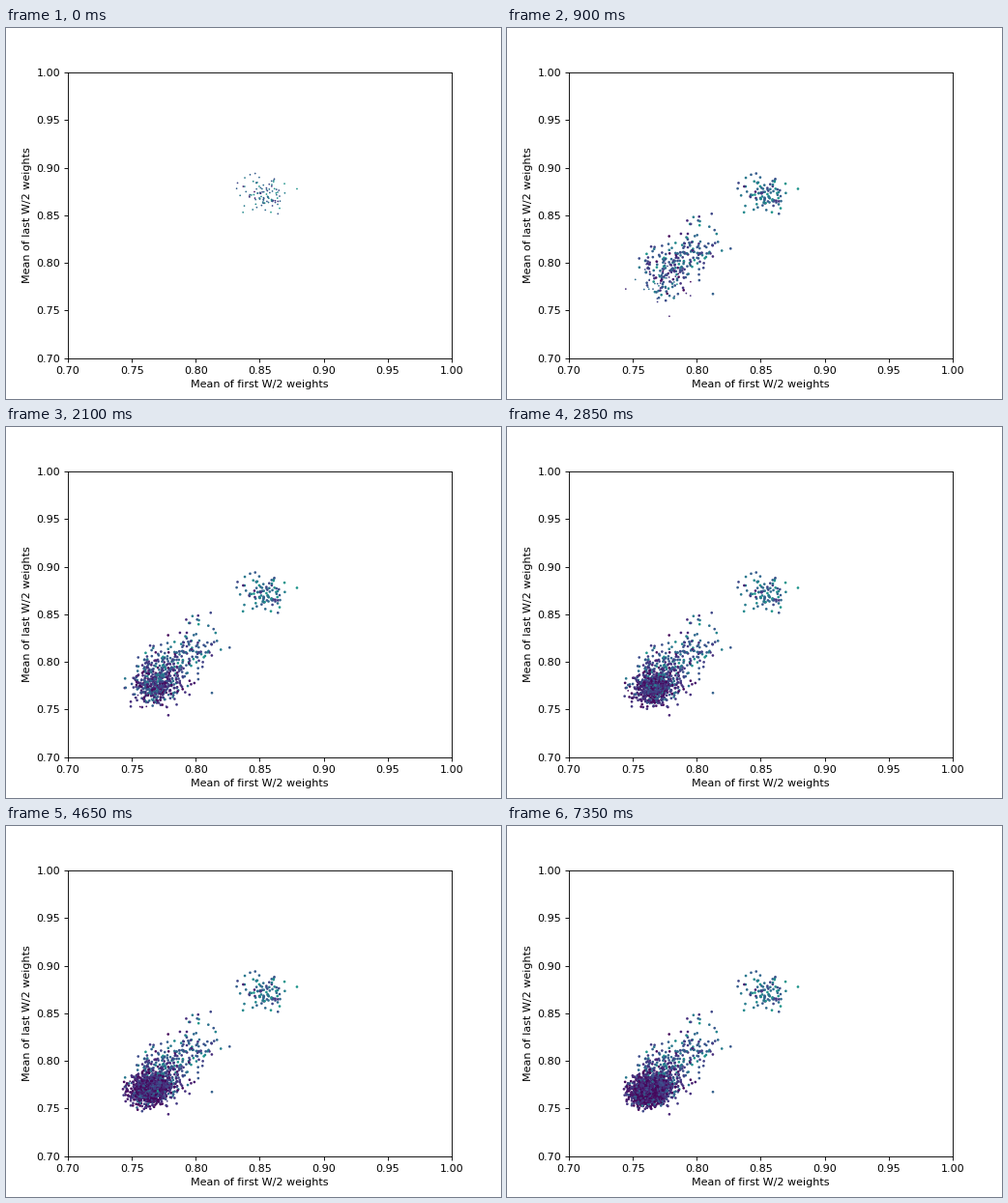
Write a matplotlib script that moves like this. It is 512 by 384 pixels and loops after 7.5 s.

```python
import numpy as np
import matplotlib.pyplot as plt
from matplotlib.animation import FuncAnimation

FRAMES, INTERVAL = 50, 150
FIRST, BATCH = 100, 48     # points in the opening batch and in each later one
FRESH, SETTLED = 2.4, 5.8  # marker areas in square points
LOW, HIGH = 0.7, 1.0

rng = np.random.default_rng(12)


def make_batch(step):
    """Positions (stage pixels) and colour values of the points born in a step."""
    if step == 0:
        size, centre, spread, tone = FIRST, (267, 172), (13, 9), 0.33
    else:
        size = BATCH
        drift = np.exp(-step / 3) + 0.25 * np.exp(-step / 16)
        shrink = np.exp(-step / 16)
        centre = (144 + 55 * drift, 277 - 57 * drift)
        spread = (7 + 10 * shrink, 5 + 8 * shrink)
        tone = 0.06 + 0.25 * shrink
    pos = rng.normal(centre, spread, (size, 2))
    value = np.clip(rng.normal(tone, 0.13, size), 0.02, 0.52)
    return pos, value


def to_data(pixels):
    """Stage pixels to axis values."""
    x = (pixels[:, 0] - 64) / 396.8
    y = (341.76 - pixels[:, 1]) / 295.68
    return LOW + (HIGH - LOW) * np.column_stack([x, y])


positions, tones = zip(*(make_batch(i) for i in range(FRAMES)))
points = to_data(np.vstack(positions))
values = np.concatenate(tones)

fig, ax = plt.subplots(figsize=(6.4, 4.8), dpi=80)
dots = ax.scatter([], [], c=[], linewidths=0, cmap="viridis", vmin=0, vmax=1)
ticks = np.linspace(LOW, HIGH, 7)
ax.set(xlim=(LOW, HIGH), ylim=(LOW, HIGH), xticks=ticks, yticks=ticks,
       xlabel="Mean of first W/2 weights", ylabel="Mean of last W/2 weights")


def draw(frame):
    count = FIRST + BATCH * frame
    settled = count - (BATCH if frame else FIRST)
    dots.set_offsets(points[:count])
    dots.set_array(values[:count])
    dots.set_sizes(np.where(np.arange(count) < settled, SETTLED, FRESH))
    return [dots]


anim = FuncAnimation(fig, draw, frames=FRAMES, interval=INTERVAL,
                     repeat=True, repeat_delay=0)
plt.show()
```
